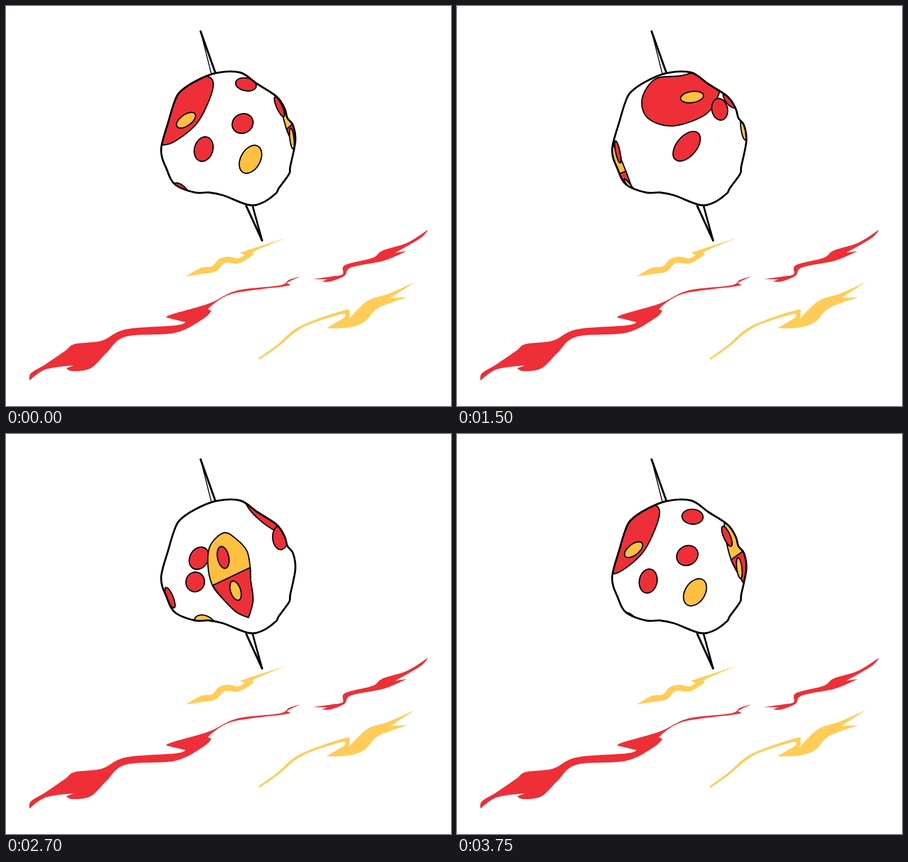
An HTML page with a canvas that plays this animation: 789x710 px, repeating every 3.9 s.

```html
<!DOCTYPE html>
<html lang="en">
<head>
<meta charset="utf-8">
<title>Spinning spotted ball</title>
<style>
html, body { margin: 0; width: 100%; height: 100%; overflow: hidden; background: #fff; }
canvas { display: block; }
</style>
</head>
<body>
<canvas id="stage" width="789" height="710"></canvas>
<script>
const ctx = document.getElementById('stage').getContext('2d');
const RED = '#ee2f37', YELLOW = '#ffbf3f', PALE = '#ffcd57', INK = '#000';
const STEP = 150, STEPS = 26;
const CENTER = { x: 395, y: 236 }, RADIUS = 122, HORIZON = 97;
const rad = deg => deg * Math.PI / 180;

// Closed smooth curve through x,y pairs; turns sharper than a right angle stay pointed.
function smooth(p) {
  const path = new Path2D(), n = p.length / 2;
  const at = i => { const k = (i + n) % n; return [p[2 * k], p[2 * k + 1]]; };
  const slope = i => {
    const [ax, ay] = at(i - 1), [x, y] = at(i), [bx, by] = at(i + 1);
    const sharp = (x - ax) * (bx - x) + (y - ay) * (by - y) < 0;
    return sharp ? [0, 0] : [(bx - ax) / 6, (by - ay) / 6];
  };
  path.moveTo(...at(0));
  for (let i = 0; i < n; i++) {
    const a = at(i), b = at(i + 1), s = slope(i), e = slope(i + 1);
    path.bezierCurveTo(a[0] + s[0], a[1] + s[1], b[0] - e[0], b[1] - e[1], ...b);
  }
  path.closePath();
  return path;
}

function oval(rx, ry, tilt) {
  const path = new Path2D();
  path.ellipse(0, 0, rx, ry, rad(tilt), 0, 2 * Math.PI);
  return path;
}

const ball = smooth([
  372,119, 415,118, 445,138, 480,161, 494,182, 499,199, 509,212, 513,240, 504,285, 502,298,
  484,323, 478,333, 455,349, 430,353, 385,336, 360,331, 335,331, 300,317, 285,290, 275,255,
  288,205, 298,172, 308,153, 335,134
]);

const streaks = [
  [RED, smooth([
    42,665, 44,652, 70,636, 105,612, 122,600, 170,594, 212,574, 300,567, 318,561, 284,553,
    295,547, 360,528, 410,505, 485,496, 502,486, 522,480, 499,491, 497,497, 400,511, 358,538,
    364,541, 350,555, 300,580, 212,587, 178,616, 150,643, 118,648, 107,643, 120,638, 70,645
  ])],
  [RED, smooth([
    543,485, 578,480, 597,476, 601,460, 650,447, 668,434, 712,420, 748,397, 735,412, 690,438,
    710,435, 670,452, 612,464, 600,479, 575,489, 560,489, 570,485
  ])],
  [PALE, smooth([
    319,480, 345,465, 365,462, 378,449, 395,445, 412,448, 423,442, 415,438, 436,431, 498,411,
    441,435, 438,442, 412,457, 388,456, 372,471, 345,476
  ])],
  [PALE, smooth([
    448,625, 480,602, 522,568, 600,540, 609,545, 608,556, 640,524, 680,510, 725,490, 682,518,
    712,517, 660,536, 635,561, 605,571, 568,572, 600,553, 595,547, 527,570, 482,605, 452,626
  ])]
];

// Patch outlines around their own middle.
const blob = [-48,-42, -3,-50, 40,-62, 66,-46, 64,-10, 40,34, -18,60, -62,44, -72,2];
const capsule = [
  -34,-50, -10,-73, 12,-62, 31,-41, 37,-11, 38,13, 42,47, 34,78, 12,68, -13,43, -30,21, -38,-15
];
const capsuleEnd = capsule.slice(8, 22);

// Color, step at mid-crossing, degrees per step, middle of the crossing, reach to the rim, shape.
const spots = [
  [RED, 35.8, 5.5, 398, 165, 106, -28, smooth(blob)],
  [YELLOW, 33, 7.5, 385, 175, 83, -35, oval(12, 22, 70)],
  [RED, 19, 7.5, 354, 209, 90, -88, oval(18, 21, 40)],
  [RED, 24, 7.5, 397, 223, 87, -56, oval(17, 20, 55)],
  [RED, 29, 7.5, 388, 231, 98, -60, oval(17, 23, 25)],
  [YELLOW, 25, 7.5, 422, 281, 88, -68, oval(19, 27, 25)],
  [RED, 35.5, 7.5, 401, 254, 95, -78, oval(18, 31, 40)],
  [YELLOW, 18, 9, 396, 248, 115, -46, smooth(capsule)],
  [RED, 18, 9, 396, 248, 115, -46, smooth(capsuleEnd)],
  [RED, 18, 9, 385, 219, 105, -42, oval(10, 20, -12)],
  [YELLOW, 18, 9, 407, 278, 105, -45, oval(9, 19, -18)]
];

function fill(path, color) {
  ctx.fillStyle = color;
  ctx.fill(path);
}

function line(width, ...p) {
  ctx.lineWidth = width;
  ctx.beginPath();
  for (let i = 0; i < p.length; i += 2) ctx.lineTo(p[i], p[i + 1]);
  ctx.stroke();
}

// A spot swings across the ball and flattens toward the rim.
function drawSpot([color, mid, rate, cx, cy, reachX, reachY, shape], step) {
  const angle = (step - mid) * rate;
  if (Math.abs(angle) > HORIZON) return;
  const swing = Math.sin(rad(angle));
  const x = cx + reachX * swing, y = cy + reachY * swing;
  const dx = x - CENTER.x, dy = y - CENTER.y;
  const squash = Math.sqrt(Math.max(0.08, 1 - (dx * dx + dy * dy) / RADIUS ** 2));
  const outward = Math.atan2(dy, dx) * 180 / Math.PI;
  const path = new Path2D();
  path.addPath(shape, new DOMMatrix()
    .translate(x, y).rotate(outward).scale(squash, 1).rotate(-outward));
  fill(path, color);
  ctx.stroke(path);
}

function draw(now) {
  const step = Math.floor(now / STEP) % STEPS;
  ctx.fillStyle = '#fff';
  ctx.fillRect(0, 0, 789, 710);
  for (const [color, path] of streaks) fill(path, color);

  ctx.strokeStyle = INK;
  ctx.lineJoin = ctx.lineCap = 'round';
  line(1.6, 345,45, 364,120);
  line(3.6, 345,45, 371,118);
  line(3.6, 426,355, 454,416);
  line(3.2, 437,354, 454,416);

  fill(ball, '#fff');
  ctx.save();
  ctx.clip(ball);
  ctx.lineWidth = 2.2;
  for (const spot of spots) {
    drawSpot(spot, step);
    drawSpot(spot, step + STEPS);
  }
  ctx.restore();
  ctx.lineWidth = 3.4;
  ctx.stroke(ball);
  requestAnimationFrame(() => draw(performance.now()));
}
draw(0);
</script>
</body>
</html>
```
